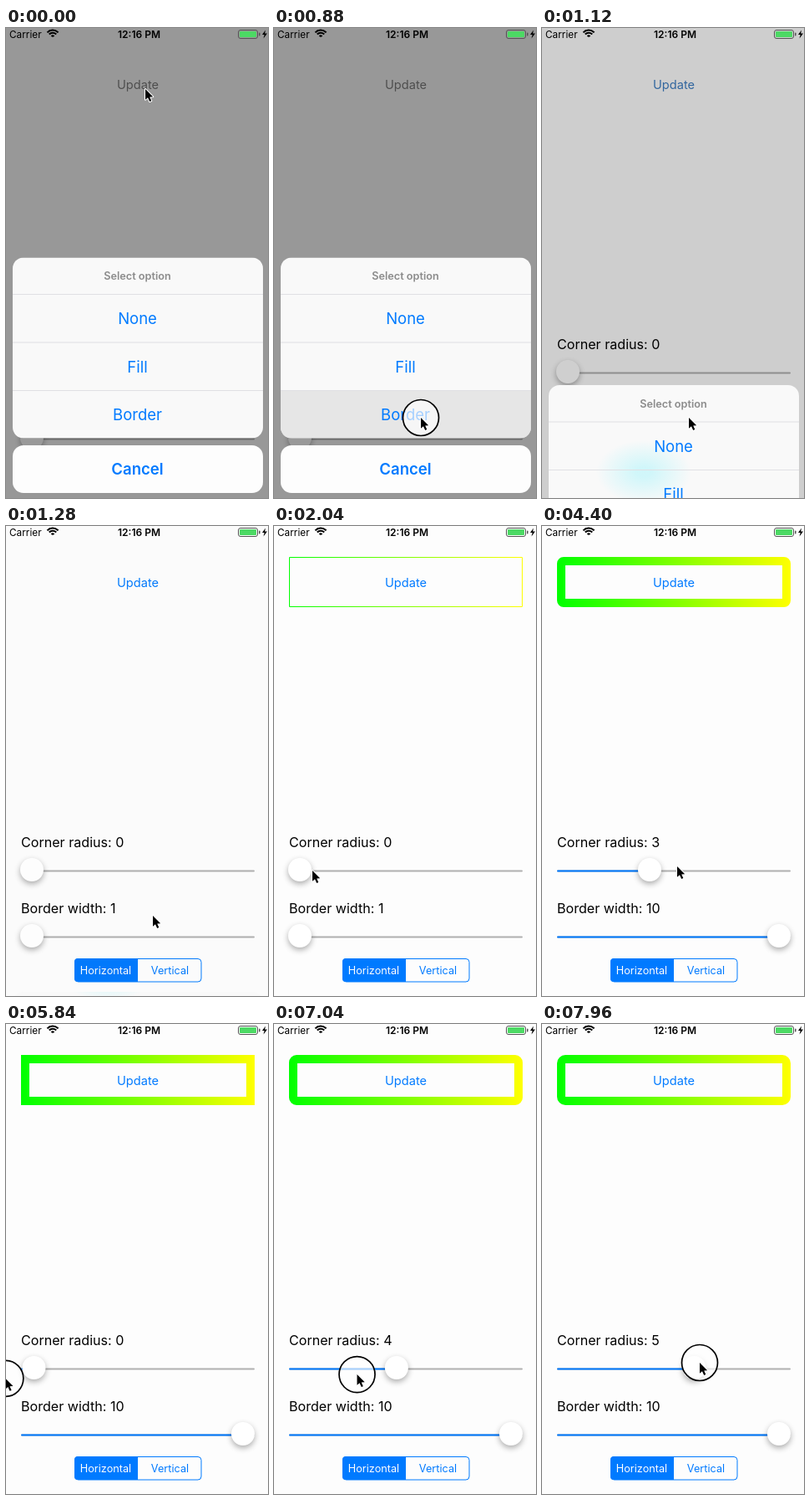
Recreate the animation shown at these times as an HTML page with a canvas. Size 314x562 px, loop 8000 ms.

```html
<!DOCTYPE html>
<html lang="en">
<head>
<meta charset="utf-8">
<title>Gradient border demo</title>
<style>
  html, body { margin: 0; width: 100%; height: 100%; overflow: hidden; background: #fdfdfd; }
  canvas { display: block; width: 314px; height: 562px; }
</style>
</head>
<body>
<canvas id="stage"></canvas>
<script>
const W = 314, H = 562, LOOP = 8000, LAG = 80;
const PAPER = '#fdfdfd', BLUE = '#007aff', INK = '#000';
const KNOB_MIN = 31, KNOB_MAX = 284, HELD = true;

const canvas = document.getElementById('stage');
const ctx = canvas.getContext('2d');
const dpr = window.devicePixelRatio || 1;
canvas.width = W * dpr;
canvas.height = H * dpr;

const clamp = (v, lo, hi) => Math.min(hi, Math.max(lo, v));
const mix = (a, b, p) => a + (b - a) * p;
const ease = p => (1 - Math.cos(Math.PI * clamp(p, 0, 1))) / 2;

// The pointer's gestures, performed one after another; each call returns its end time
const moves = [];
let hand = { end: 0, x: 167, y: 73 };
function glide(duration, x, y, held = false) {
  const move = { from: hand, start: hand.end, end: hand.end + duration, x, y, held };
  moves.push(move);
  hand = move;
  return move.end;
}
const rest = (duration, held) => glide(duration, hand.x, hand.y, held);

// Choose "Border"
glide(720, 176, 466);
const chosen = rest(190, HELD);
rest(490);
// Raise the corner radius
glide(600, 46, 412);
const radiusGrab = rest(100);
rest(100, HELD);
glide(680, 144, 412, HELD);
const radiusDrop = rest(80, HELD);
// Raise the border width
const widthGrab = glide(310, 35, 482);
rest(130, HELD);
glide(650, 300, 485, HELD);
const widthDrop = rest(70, HELD);
// Scrub the radius back and forth until the end
glide(280, 162, 407);
const scrubGrab = glide(200, 130, 409);
for (const x of [287, -18, 287, 20, 189]) glide(672, x, x < 100 ? 425 : 405, HELD);

function pointer(t) {
  const move = moves.find(m => t < m.end) || hand;
  const p = ease((t - move.start) / (move.end - move.start));
  return { x: mix(move.from.x, move.x, p), y: mix(move.from.y, move.y, p), held: move.held };
}

// A knob trails the pointer between grab and drop
const follow = (t, grab, drop, offset) =>
  clamp(pointer(clamp(t - LAG, grab, drop - 1)).x + offset, KNOB_MIN, KNOB_MAX);
const radiusKnob = t => t < scrubGrab
  ? follow(t, radiusGrab, radiusDrop, -15)
  : follow(t, scrubGrab, LOOP, -1);
const widthKnob = t => follow(t, widthGrab, widthDrop, -4);
const steps = (x, count) => Math.floor((x - KNOB_MIN) / (KNOB_MAX - KNOB_MIN) * count);

function text(str, x, y, size, color, align = 'center', weight = 400) {
  ctx.font = `${weight} ${size}px Inter, Roboto, sans-serif`;
  ctx.textAlign = align;
  ctx.fillStyle = color;
  ctx.fillText(str, x, y);
}

function box(x, y, w, h, r = 0) {
  ctx.beginPath();
  ctx.roundRect(x, y, w, h, r);
}

function fillBox(color, ...rect) {
  ctx.fillStyle = color;
  box(...rect);
  ctx.fill();
}

function strokeBox(color, width, ...rect) {
  ctx.strokeStyle = color;
  ctx.lineWidth = width;
  box(...rect);
  ctx.stroke();
}

const BOLT = new Path2D('M311 2.5l-4 5.5h2.7l-1.2 4.5l4.5-5.9h-2.8z');
const ARROW = new Path2D('M0 0v12.8l3-2.6l2.2 4.8l2.1-.9l-2.1-4.7l4-.2z');

function drawStatus() {
  text('Carrier', 4, 11.5, 11.8, INK, 'left');
  text('12:16 PM', 159.5, 11.5, 12, INK, 'center', 600);
  ctx.strokeStyle = INK;
  ctx.lineWidth = 2;
  for (const r of [9, 5.8, 2]) {
    ctx.beginPath();
    ctx.arc(56, 11.5, r, -Math.PI * 0.76, -Math.PI * 0.24);
    ctx.stroke();
  }
  strokeBox('#555', 1, 278.5, 2.5, 23, 10, 2.5);
  fillBox('#4cd964', 280, 4, 20, 7, 1);
  fillBox('#555', 303, 5.5, 1.5, 4, 1);
  ctx.fillStyle = INK;
  ctx.fill(BOLT);
}

function drawBorder(radius, width) {
  const gradient = ctx.createLinearGradient(18, 0, 298, 0);
  gradient.addColorStop(0, '#0f0');
  gradient.addColorStop(1, '#ff0');
  strokeBox(gradient, width, 18 + width / 2, 37 + width / 2, 280 - width, 60 - width, radius);
}

function drawSlider(x, y, tint) {
  fillBox('#b0b0b0', 18, y - 0.5, 280, 2, 1);
  fillBox(tint, 18, y - 0.5, x - 18, 2, 1);
  ctx.save();
  ctx.shadowColor = 'rgba(0, 0, 0, .32)';
  ctx.shadowBlur = 7 * dpr;
  ctx.shadowOffsetY = 3 * dpr;
  ctx.fillStyle = '#fff';
  ctx.beginPath();
  ctx.arc(x, y - 1, 14, 0, 7);
  ctx.fill();
  ctx.restore();
}

function drawSegments(tint) {
  fillBox(tint, 82, 517, 76, 28, [4, 0, 0, 4]);
  strokeBox(tint, 1, 82.5, 517.5, 151.5, 27.5, 4);
  text('Horizontal', 119.5, 536, 12.7, PAPER);
  text('Vertical', 196.5, 536, 12.7, tint);
}

// Blue segment shining through the translucent sheet
function drawGlow() {
  ctx.save();
  ctx.translate(122, 531);
  ctx.scale(1.5, 1);
  const glow = ctx.createRadialGradient(0, 0, 6, 0, 0, 38);
  glow.addColorStop(0, 'rgba(204, 246, 250, .9)');
  glow.addColorStop(1, 'rgba(204, 246, 250, 0)');
  ctx.fillStyle = glow;
  ctx.fillRect(-38, -38, 76, 76);
  ctx.restore();
}

function drawSheet(closing, pressed) {
  const top = 274.5 + 287 * closing;
  ctx.save();
  box(8, top, 300, 216, 13);
  ctx.clip();
  fillBox('#f9f9f9', 8, top, 300, 216);
  if (closing > 0) drawGlow();
  if (pressed) fillBox('#e6e6e6', 8, top + 159, 300, 57);
  text('Select option', 157.5, top + 26.5, 12.7, '#8c8c8c', 'center', 600);
  ['None', 'Fill', 'Border'].forEach((label, row) => {
    const y = top + 43.5 + row * 57.5;
    fillBox('#e0e0e4', 8, y, 300, 1);
    text(label, 157.5, y + 36, 18.5, BLUE);
  });
  ctx.restore();

  fillBox(PAPER, 8, top + 224.5, 300, 57, 13);
  text('Cancel', 157.5, top + 259.5, 18.6, BLUE, 'center', 600);
}

function drawPointer({ x, y, held }) {
  ctx.save();
  ctx.translate(x, y);
  if (held) {
    ctx.beginPath();
    ctx.arc(0, 0, 21.5, 0, 7);
    ctx.fillStyle = 'rgba(255, 255, 255, .65)';
    ctx.fill();
    ctx.strokeStyle = INK;
    ctx.lineWidth = 1.7;
    ctx.stroke();
  }
  ctx.strokeStyle = '#fff';
  ctx.lineWidth = 2;
  ctx.lineJoin = 'round';
  ctx.stroke(ARROW);
  ctx.fillStyle = INK;
  ctx.fill(ARROW);
  ctx.restore();
}

function draw(t) {
  const closing = ease((t - chosen - 3) / 400);
  const gray = 128 * (1 - closing);
  const tint = `rgb(${gray}, ${mix(128, 122, closing)}, ${mix(128, 255, closing)})`;
  const radiusX = radiusKnob(t), widthX = widthKnob(t);
  const radius = steps(radiusX, 10), width = 1 + steps(widthX, 9);

  ctx.setTransform(dpr, 0, 0, dpr, 0, 0);
  fillBox(PAPER, 0, 0, W, H);
  if (closing === 1) drawBorder(radius, width);
  text('Update', 158, 72.5, 14.6, tint);
  text(`Corner radius: ${radius}`, 18, 384, 16.1, INK, 'left');
  drawSlider(radiusX, 412, tint);
  text(`Border width: ${width}`, 18, 462.5, 16.1, INK, 'left');
  drawSlider(widthX, 491, tint);
  drawSegments(tint);

  if (closing < 1) {
    fillBox(`rgba(0, 0, 0, ${0.4 * (1 - closing)})`, 0, 0, W, H);
    drawSheet(closing, t > chosen - 170 && t < chosen + 20);
  }
  drawStatus();
  drawPointer(pointer(t));
}

const start = performance.now();
function tick() {
  draw((performance.now() - start) % LOOP);
  requestAnimationFrame(tick);
}
tick();
</script>
</body>
</html>
```
